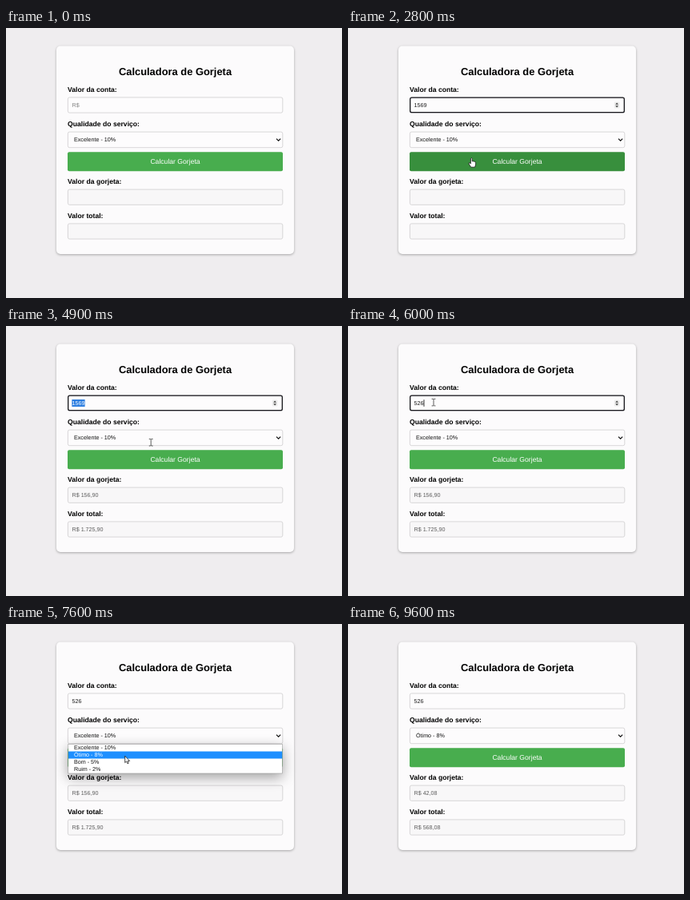
Animation, 420 px wide and 338 px high, one loop 9.7 s. Source, as an HTML page:

```html
<!DOCTYPE html>
<html lang="pt-BR">
<head>
<meta charset="utf-8">
<title>Calculadora de Gorjeta</title>
<style>
  html, body { margin: 0; width: 100%; height: 100%; overflow: hidden; background: #efedef; }
  svg { display: block; width: 420px; height: 338px; text-rendering: geometricPrecision;
        font: 7.17px "Liberation Sans", Arial, sans-serif; }
  .card { fill: #fcfbfc; filter: drop-shadow(0 1.2px 1.8px rgba(0, 0, 0, .3)); }
  .title { font-size: 12.9px; font-weight: bold; text-anchor: middle; }
  .label { font-size: 8.62px; font-weight: bold; }
  .field { fill: #fdfcfd; stroke: #cfcdcf; stroke-width: .8; }
  .result { fill: #f8f7f8; }
  .muted { fill: #5c5c5c; }
  .focus { fill: none; stroke: #17171c; stroke-width: 1.3; }
  .button { fill: #48ad4e; }
  .button.hover { fill: #388f3d; }
  .button-text { font-size: 8.62px; fill: #fff; text-anchor: middle; }
  .menu { filter: drop-shadow(0 5px 8px rgba(0, 0, 0, .36)); }
  .ibeam { fill: none; stroke: #333; stroke-width: .8; }
  .arrow, .hand { fill: #fff; stroke: #111; stroke-width: .75; stroke-linejoin: round; }
</style>
</head>
<body>
<svg viewBox="0 0 420 338">
  <rect class="card" x="63" y="22.5" width="297" height="260.5" rx="5"/>
  <text class="title" x="211.5" y="59.3">Calculadora de Gorjeta</text>

  <text class="label" x="77" y="80">Valor da conta:</text>
  <rect class="field" x="77.4" y="86.9" width="268.4" height="19.2" rx="2"/>
  <g id="focus">
    <rect class="focus" x="77.7" y="87.2" width="267.6" height="18.5" rx="2"/>
    <rect x="332.8" y="92.5" width="6.6" height="8" rx="1" fill="#ececec"/>
    <path d="M334.2 95.7 336.1 93.5 338 95.7ZM334.2 97.3 336.1 99.5 338 97.3Z" fill="#444"/>
  </g>
  <rect id="selection" x="82.4" y="92" width="16.2" height="9" fill="#2b7de0"/>
  <text id="amount" x="82.5" y="98.9"></text>
  <rect id="caret" y="92.2" width=".8" height="8.6"/>

  <text class="label" x="77" y="123">Qualidade do serviço:</text>
  <rect class="field" x="77.4" y="130.1" width="268.4" height="19.6" rx="2"/>
  <text id="quality" x="85" y="142.2" fill="#111"></text>
  <path d="M338 138.6 340.6 141.1 343.2 138.6" fill="none" stroke="#111" stroke-width="1.3"/>

  <rect id="button" class="button" x="77" y="155.3" width="269" height="24" rx="2"/>
  <text class="button-text" x="211.5" y="170.3">Calcular Gorjeta</text>

  <text class="label" x="77" y="195.2">Valor da gorjeta:</text>
  <rect class="field result" x="77.4" y="202.1" width="268.4" height="19.2" rx="2"/>
  <text id="tip" class="muted" x="82.5" y="213.7"></text>

  <text class="label" x="77" y="238">Valor total:</text>
  <rect class="field result" x="77.4" y="244.9" width="268.4" height="19.2" rx="2"/>
  <text id="total" class="muted" x="82.5" y="256.6"></text>

  <g id="menu" class="menu">
    <rect x="77.8" y="150.4" width="267.6" height="36.6" fill="#fff" stroke="#8a8a8a" stroke-width=".5"/>
    <rect id="mark" x="78" width="267.2" height="9" fill="#1e8fff"/>
    <g id="options"></g>
  </g>

  <g id="cursor">
    <path class="ibeam" d="M-2.4-4.3H-.6L0-3.7.6-4.3H2.4M0-3.7V3.7M-2.4 4.3H-.6L0 3.7.6 4.3H2.4"/>
    <path class="arrow" d="M0 0V8.4L1.9 6.7 3.2 9.6 4.6 9 3.4 6.2H5.9Z"/>
    <path class="hand" d="M-.9.7Q0-.7.9.7V4.2Q1.8 3.5 2.5 4.4 3.4 3.8 4 4.8 5.2 4.5 5.3 5.8V8.3L4.3 11.5H-.6L-3.2 7.4Q-3.6 5.7-2.2 6L-.9 7.2Z"/>
  </g>
</svg>
<script>
const LOOP = 9700, STEP = 100, BLINK = 530, ROW = 9, DIGIT = 3.99;
const $ = id => document.getElementById(id);

const options = ['Excelente - 10%', 'Ótimo - 8%', 'Bom - 5%', 'Ruim - 2%'];
const visits = [
  { bill: 1569, rate: .10, focus: 660, type: 1350, gap: 170, blur: 2900, paid: 3000 },
  { bill: 526, rate: .08, focus: 3700, type: 5500, gap: 200, blur: 6200, paid: 8400 }
];
const drag = { start: 4300, marked: 4500, end: 6000 };
const menu = { open: 6800, move: 7300, close: 7800 };

// each move: start, end, and where the pointer comes to rest
const entry = [196, 228];
const moves = [
  [100, 800, [124, 96.4]],
  [2100, 2200, [132, 181.5]],
  [2200, 2600, [154.3, 162.7]],
  [3000, 3300, [142, 244]],
  [3300, 3700, [116, 96.4]],
  [drag.start, 5200, [204, 163]],
  [5300, drag.end, [107, 95.6]],
  [6200, 6700, [150, 141]],
  [6900, 7600, [148.7, 165.2]],
  [7800, 8200, [151.3, 176.3]],
  [8800, 9300, [154, 188]]
];

const within = (t, a, b) => t >= a && t < b;
const show = (el, on) => el.style.display = on ? '' : 'none';
const ease = k => k * k * (3 - 2 * k);
const money = n => 'R$ ' + n.toFixed(2).replace('.', ',').replace(/\B(?=(\d{3})+,)/g, '.');

function pointer(t) {
  return moves.reduce((from, [start, end, to]) => {
    const k = ease(Math.min(1, Math.max(0, (t - start) / (end - start))));
    return from.map((v, i) => v + (to[i] - v) * k);
  }, entry);
}

const optionTexts = options.map((label, i) => {
  const el = document.createElementNS('http://www.w3.org/2000/svg', 'text');
  el.textContent = label;
  el.setAttribute('x', 85);
  el.setAttribute('y', 157.3 + ROW * i);
  return $('options').appendChild(el);
});
const shapes = [...$('cursor').children];

function drawAmount(t) {
  const selected = within(t, drag.marked, visits[1].type);
  const focused = visits.find(v => within(t, v.focus, v.blur));
  const typed = visits.findLast(v => t >= v.type);
  let text = '', caretOn = false;
  if (typed) text = String(typed.bill).slice(0, 1 + Math.floor((t - typed.type) / typed.gap));
  if (focused) {
    const since = typed === focused ? typed.type + (text.length - 1) * typed.gap : focused.focus;
    caretOn = !selected && (t - since) % (2 * BLINK) < BLINK;
  }
  $('amount').textContent = text || 'R$';
  $('amount').setAttribute('fill', selected ? '#fff' : text ? '#1a1a1a' : '#808080');
  $('caret').setAttribute('x', 82.6 + text.length * DIGIT);
  show($('caret'), caretOn);
  show($('focus'), focused);
  show($('selection'), selected);
}

function drawResults(t) {
  const paid = visits.findLast(v => t >= v.paid);
  $('tip').textContent = paid ? money(paid.bill * paid.rate) : '';
  $('total').textContent = paid ? money(paid.bill * (1 + paid.rate)) : '';
}

function drawMenu(t) {
  const active = t < menu.move ? 0 : 1;
  $('quality').textContent = options[t < menu.close ? 0 : 1];
  $('mark').setAttribute('y', 150.5 + ROW * active);
  optionTexts.forEach((el, i) => el.setAttribute('fill', i === active ? '#fff' : '#111'));
  show($('menu'), within(t, menu.open, menu.close));
}

function drawPointer(t) {
  const [x, y] = pointer(t);
  const visible = within(t, 100, 9400);
  const dragging = within(t, drag.start, drag.end);
  const busy = dragging || within(t, menu.open, menu.close);
  const hover = visible && !busy && within(y, 155.5, 179.5);
  const kind = dragging || within(y, 87, 106) ? 0 : hover ? 2 : 1;
  $('button').classList.toggle('hover', hover);
  $('cursor').setAttribute('transform', `translate(${x} ${y})`);
  show($('cursor'), visible);
  shapes.forEach((el, i) => show(el, i === kind));
}

function frame() {
  const t = Math.floor(performance.now() % LOOP / STEP) * STEP;
  drawAmount(t);
  drawResults(t);
  drawMenu(t);
  drawPointer(t);
  requestAnimationFrame(frame);
}
frame();
</script>
</body>
</html>
```
